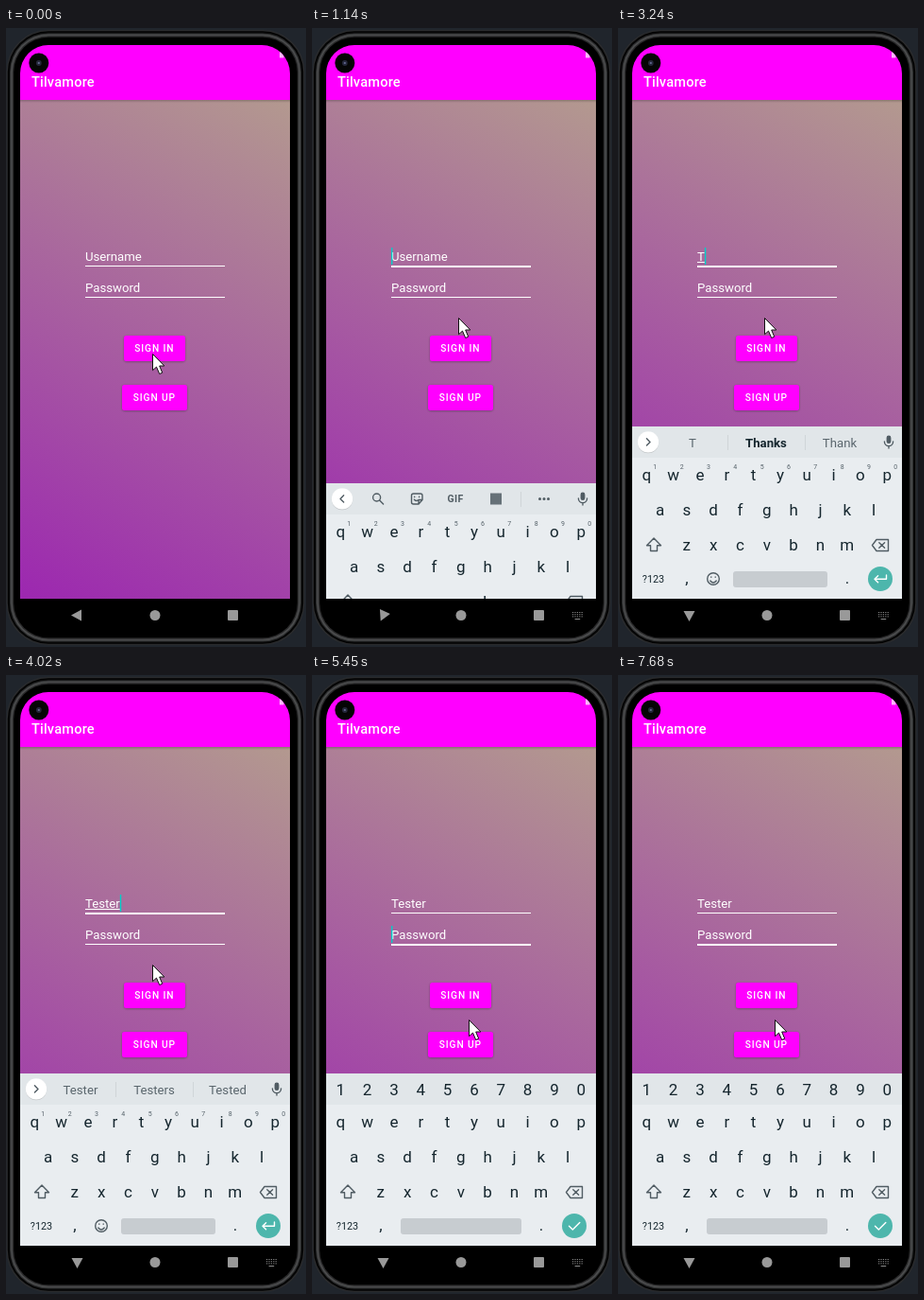
Write an HTML page that moves like this. It is 318 px wide and 654 px high and loops after 8000 ms.

```html
<!DOCTYPE html>
<html lang="en">
<head>
<meta charset="utf-8">
<title>Sign in</title>
<style>
html, body { margin: 0; width: 100%; height: 100%; overflow: hidden; background: #20252c; }
svg { display: block; width: 318px; height: 654px; font-family: Roboto, "Noto Sans", sans-serif; }
.field { font-size: 13.2px; fill: #fff; }
.btn { font-size: 10.2px; font-weight: 500; letter-spacing: .0893em; fill: #fff; }
.mid { text-anchor: middle; }
.key { font-size: 17px; fill: #15262e; }
.hint { font-size: 7px; fill: #56626a; }
.word { font-size: 13.2px; fill: #5a666d; }
.line { fill: none; stroke: #505c63; stroke-width: 1.4; stroke-linejoin: round; stroke-linecap: round; }
.gray { fill: #505c63; }
</style>
</head>
<body>
<svg viewBox="0 0 318 654">
  <defs>
    <linearGradient id="bg" gradientUnits="userSpaceOnUse" x1="15" y1="603" x2="301" y2="76">
      <stop offset="0" stop-color="#9c27b0"/><stop offset="1" stop-color="#b3998f"/>
    </linearGradient>
    <linearGradient id="shade" x1="0" y1="0" x2="0" y2="1">
      <stop offset="0" stop-color="#000" stop-opacity=".22"/><stop offset="1" stop-color="#000" stop-opacity="0"/>
    </linearGradient>
    <filter id="soft" x="-20%" y="-30%" width="140%" height="160%"><feGaussianBlur stdDeviation="1"/></filter>
    <clipPath id="screen"><path d="M15 603V48A30 30 0 0 1 45 18H271A30 30 0 0 1 301 48V603Z"/></clipPath>
  </defs>

  <!-- phone body -->
  <rect width="318" height="654" fill="#20252c"/>
  <g id="body"></g>

  <g clip-path="url(#screen)">
    <rect x="15" y="76" width="286" height="527" fill="url(#bg)"/>
    <rect x="15" y="76" width="286" height="3" fill="url(#shade)"/>
    <rect x="15" y="18" width="286" height="58" fill="#f0f"/>
    <rect x="290" y="25" width="4.5" height="6.5" rx=".6" fill="#ffb5ff"/>
    <text x="27" y="62" font-size="14.6" font-weight="500" letter-spacing=".18" fill="#fff">Tilvamore</text>
    <circle cx="34.8" cy="37" r="10.5" fill="#050505"/>
    <circle cx="34.8" cy="37" r="2.9" fill="#25273a"/>
    <circle cx="34.8" cy="37" r="1.1" fill="#666c96"/>

    <text id="user" class="field" x="84" y="246"></text>
    <rect id="under" x="84" y="247" height="1" fill="#fff"/>
    <rect id="userLine" x="84" y="251" width="148" fill="#fff"/>
    <text class="field" x="84" y="279">Password</text>
    <rect id="passLine" x="84" y="284" width="148" fill="#fff"/>
    <rect id="caret" width="1.4" height="18" fill="#03cfc8"/>
    <g id="buttons"></g>
    <g id="keyboard"></g>
  </g>

  <!-- navigation bar -->
  <g fill="#999">
    <path id="back" d="M69 620.5L80 614.5V626.5Z"/>
    <circle cx="158" cy="620.5" r="5.5"/>
    <rect x="235" y="615" width="11" height="11" rx="1"/>
    <g id="ime"></g>
  </g>
  <path id="cursor" d="M0 0V17.2L4 13.6L7.2 21L10.2 19.7L7.2 12.5H12.3Z" fill="#fff" stroke="#111" stroke-width="1"/>
</svg>

<script>
const LOOP = 8000;
const $ = id => document.getElementById(id);
const set = (id, attrs) => { for (const k in attrs) $(id).setAttribute(k, attrs[k]); };
const show = (id, on) => set(id, { display: on ? 'inline' : 'none' });
const text = (cls, x, y, s, extra = '') => `<text class="${cls}" x="${x}" y="${y}" ${extra}>${s}</text>`;
const rect = (x, y, w, h, r, fill) => `<rect x="${x}" y="${y}" width="${w}" height="${h}" rx="${r}" fill="${fill}"/>`;
const path = (d, cls = 'line') => `<path class="${cls}" d="${d}"/>`;
const PITCH = 28.33;

// Concentric shells, from the outer edge inwards.
const SHELLS = [[0.5, '#2b2c2e'], [1.8, '#050505'], [4, '#303132'], [5.2, '#4c4d4e'], [6.8, '#2a2a2b'], [8.2, '#000']];
const shell = ([d, fill]) => rect(d, d + 1.5, 317 - 2 * d, 651 - 2 * d, 45 - d, fill);

const button = (x, y, w, label, tx) =>
  `<rect x="${x}" y="${y + .8}" width="${w}" height="27" rx="3" fill="#000" opacity=".3" filter="url(#soft)"/>` +
  rect(x, y, w, 27, 2.5, '#f0f') + text('btn', tx, y + 17.2, label);

const row = (chars, x, y, cls = 'key mid') =>
  [...chars].map((c, i) => text(cls, x + i * PITCH, y, c)).join('');

const dividers = xs => xs.map(x => rect(x, 430, 1, 16, 0, '#cfd5d8')).join('');
const mic = rect(284.6, 430.5, 4.8, 8.6, 2.4, '#505c63') +
  path('M282.4 437a4.6 4.6 0 0 0 9.2 0M287 441.8V444');

function toolbar() {
  const dots = [241.5, 246, 250.5].map(x => `<circle class="gray" cx="${x}" cy="437.5" r="1.5"/>`).join('');
  return path('M33.6 433.8L30 437.4L33.6 441') +
    '<circle class="line" cx="68.6" cy="436" r="4"/>' + path('M71.6 439L75.6 443') +
    path('M107.5 432H115Q117 432 117 434V438.5L113 443H107.5Q105.5 443 105.5 441V434Q105.5 432 107.5 432ZM117 438.5H113V443M108.4 438.2Q110.4 440.4 112 439M108.7 435.3v.2M113.6 435.3v.2') +
    text('gray mid', 152, 441.2, 'GIF', 'font-size="10.5" font-weight="700" letter-spacing=".4"') +
    rect(189, 431.5, 12, 12, 0, '#667178') + dividers([221]) + dots;
}

function buildKeyboard() {
  const smile = '<circle class="line" cx="101" cy="582" r="6.3"/>' +
    path('M97.8 584Q101 588 104.2 584M98.8 580v.2M103.2 580v.2');
  $('keyboard').innerHTML =
    rect(15, 421, 286, 182, 0, '#e9edf0') + rect(15, 421, 286, 33, 0, '#e1e6e9') +
    row('qwertyuiop', 30.3, 478) + row('asdfghjkl', 44.5, 515) + row('zxcvbnm', 72.8, 552) +
    path('M38 539L30.5 546.8H34.5V552.5H41.5V546.8H45.5Z') +
    path('M274 540.5H286.5V552.5H274L269.5 546.5ZM276.8 543.7L282.6 549.3M282.6 543.7L276.8 549.3') +
    text('key mid', 37.5, 586, '?123', 'style="font-size:10.8px"') +
    text('key mid', 73, 587, ',') + text('key mid', 243, 587, '.') +
    '<circle cx="278" cy="582" r="13" fill="#4db6ac"/>' +
    '<g id="plain">' + row('1234567890', 39.3, 466.2, 'hint mid') + smile +
      rect(122, 574, 100, 17, 3, '#c7ccd0') +
      '<circle cx="32" cy="438" r="11.2" fill="#000" opacity=".15"/><circle cx="32" cy="437.4" r="11.2" fill="#fff"/>' + mic +
      path('M284.5 578V582.3H272.3M275.6 578.8L272 582.3L275.6 585.8" style="stroke:#fff') +
      `<g id="tools">${toolbar()}</g>` +
      '<g id="words">' + path('M30.4 433.8L34 437.4L30.4 441') + dividers([116, 198]) +
        [79, 157, 235].map((x, i) => text('word mid', x, 443, '', `id="word${i}"`)).join('') + '</g>' +
    '</g>' +
    '<g id="secret">' + row('1234567890', 30.3, 444) + rect(94, 574, 128, 17, 3, '#c7ccd0') +
      path('M272.5 582.3L276.3 586L283.8 578.4" style="stroke:#fff') + '</g>';
}

function buildIme() {
  let s = '';
  for (let r = 0; r < 3; r++)
    for (let c = 0; c < 5; c++) s += rect(276 + c * 2.4, 617 + r * 2.2, 1.2, 1, 0, '#8a8a8a');
  $('ime').innerHTML = s + rect(278.6, 624, 5.6, 1, 0, '#8a8a8a');
}

// Each track lists [time, value...]; a value holds until the next time.
const at = (track, t) => track.filter(k => k[0] <= t).pop();

const POINTER = [[0, 155.5, 344.5], [150, 156, 347], [300, 145, 299], [420, 132.5, 248.5],
  [570, 127.5, 236.5], [870, 143, 274], [990, 155.5, 306.5], [4550, 141, 287],
  [4670, 128.5, 271.5], [5300, 136.5, 314.5], [5450, 166.5, 364.5]];
const BLINK = [0, 720, 1260, 1690, 2250, 2680, 4550, 4820, 5730, 6160, 6720, 7120, 7680];
const TURN = [[0, 0], [990, -20], [1140, -65], [1260, -90]];
const TYPED = [[0, ''], [3240, 'T', 'Thanks', 'Thank'], [3390, 'Te', 'Text', 'The'],
  [3510, 'Tes', 'Test', 'Yes'], [3750, 'Test', 'Tests', 'Texts'],
  [3900, 'Teste', 'Tested', 'Tester'], [4020, 'Tester', 'Testers', 'Tested']];

function draw(t) {
  const [, px, py] = at(POINTER, t);
  set('cursor', { transform: `translate(${px} ${py})` });

  const onUser = t >= 720 && t < 4820, onPass = t >= 4820;
  const [, typed, ...more] = at(TYPED, t);
  $('user').textContent = typed || 'Username';
  const width = typed ? $('user').getComputedTextLength() : 0;
  set('userLine', { height: onUser ? 2 : 1 });
  set('passLine', { height: onPass ? 2 : 1 });
  set('under', { width });
  show('under', typed && onUser);
  set('caret', { x: onPass ? 84 : 84 + width, y: onPass ? 265 : 232 });
  show('caret', BLINK.filter(b => b <= t).length % 2 === 0);

  show('keyboard', t >= 1140);
  set('keyboard', { transform: `translate(0 ${t < 1260 ? 60 : 0})` });
  show('plain', t < 4940);
  show('secret', t >= 4940);
  show('tools', !typed);
  show('words', typed);
  [typed, ...more].forEach((w, i) => {
    $('word' + i).textContent = w;
    const bold = typed === 'T' && i === 1;
    $('word' + i).setAttribute('style', bold ? 'font-weight:700;fill:#15262e' : '');
  });

  set('back', { transform: `rotate(${at(TURN, t)[1]} 75.5 620.5)` });
  show('ime', t >= 990);
}

$('body').innerHTML = SHELLS.map(shell).join('');
$('buttons').innerHTML = button(125, 325, 65, 'SIGN IN', 136.2) + button(123, 377, 69, 'SIGN UP', 134.7);
buildKeyboard();
buildIme();

function tick() {
  draw(performance.now() % LOOP);
  requestAnimationFrame(tick);
}
tick();
</script>
</body>
</html>
```
